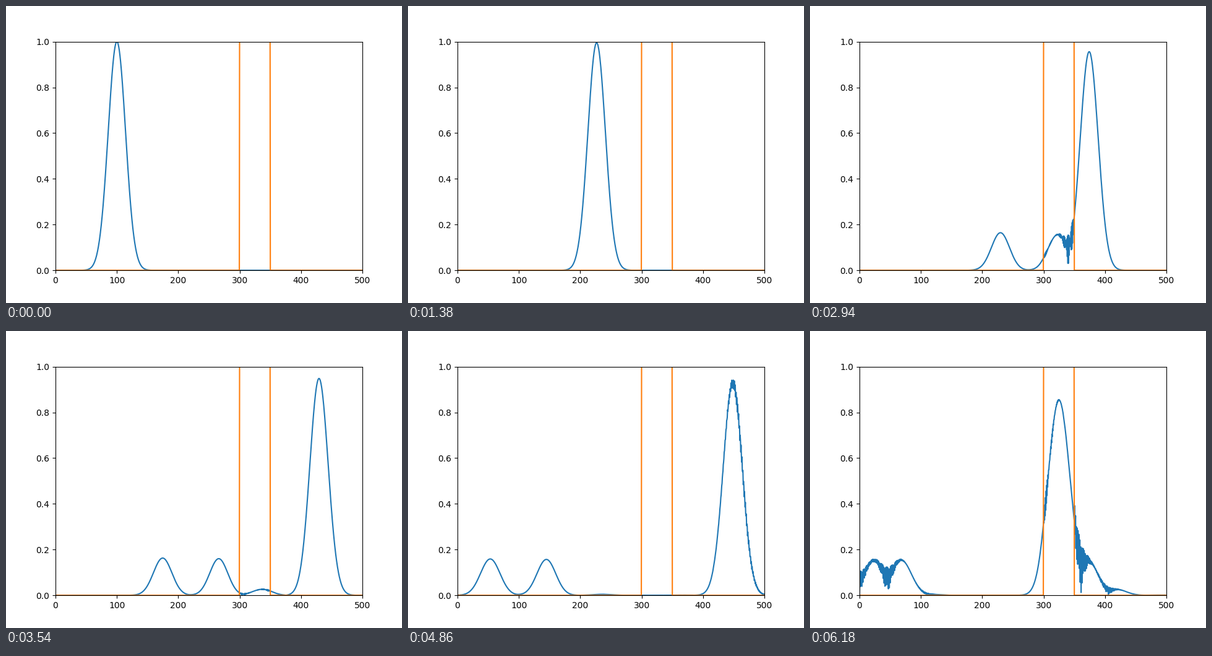
These frames come from a looping animation (640x480 px, 6240 ms). A matplotlib script:

```python
import numpy as np
import matplotlib.pyplot as plt
from matplotlib.animation import FuncAnimation

FRAMES = 104
INTERVAL = 60          # ms
STEPS = 120            # time steps per frame
DX, DT = 0.5, 0.025
K0, X0, WIDTH = 4.0, 100.0, 20.0
HEIGHT = 1.25          # barrier height

x = np.arange(0, 500, DX)
V = np.where((x >= 300) & (x < 350), HEIGHT, 0.0)


def hamiltonian(psi):
    """Apply -1/2 d2/dx2 + V with hard walls at both ends."""
    out = np.zeros_like(psi)
    out[1:-1] = ((1 / DX**2 + V[1:-1]) * psi[1:-1]
                 - (psi[2:] + psi[:-2]) / (2 * DX**2))
    return out


def simulate():
    """Leapfrog the wave packet and return |psi| for every frame."""
    psi = np.exp(-((x - X0) / WIDTH) ** 2 + 1j * K0 * x)
    psi[[0, -1]] = 0
    # Taylor step backwards in time to start the leapfrog cleanly
    prev, term = psi.copy(), psi
    for n in range(1, 5):
        term = 1j * DT / n * hamiltonian(term)
        prev = prev + term
    amps = [np.abs(psi)]
    for _ in range(FRAMES - 1):
        for _ in range(STEPS):
            prev, psi = psi, prev - 2j * DT * hamiltonian(psi)
        amps.append(np.abs(psi))
    return amps


amps = simulate()

fig, ax = plt.subplots(figsize=(6.4, 4.8), dpi=100)
wave, = ax.plot(x, amps[0])
ax.plot(x, V)
ax.set_xlim(0, 500)
ax.set_ylim(0, 1)


def update(i):
    wave.set_ydata(amps[i])
    return wave,


anim = FuncAnimation(fig, update, frames=FRAMES, interval=INTERVAL,
                     repeat=True, repeat_delay=0)
plt.show()
```
